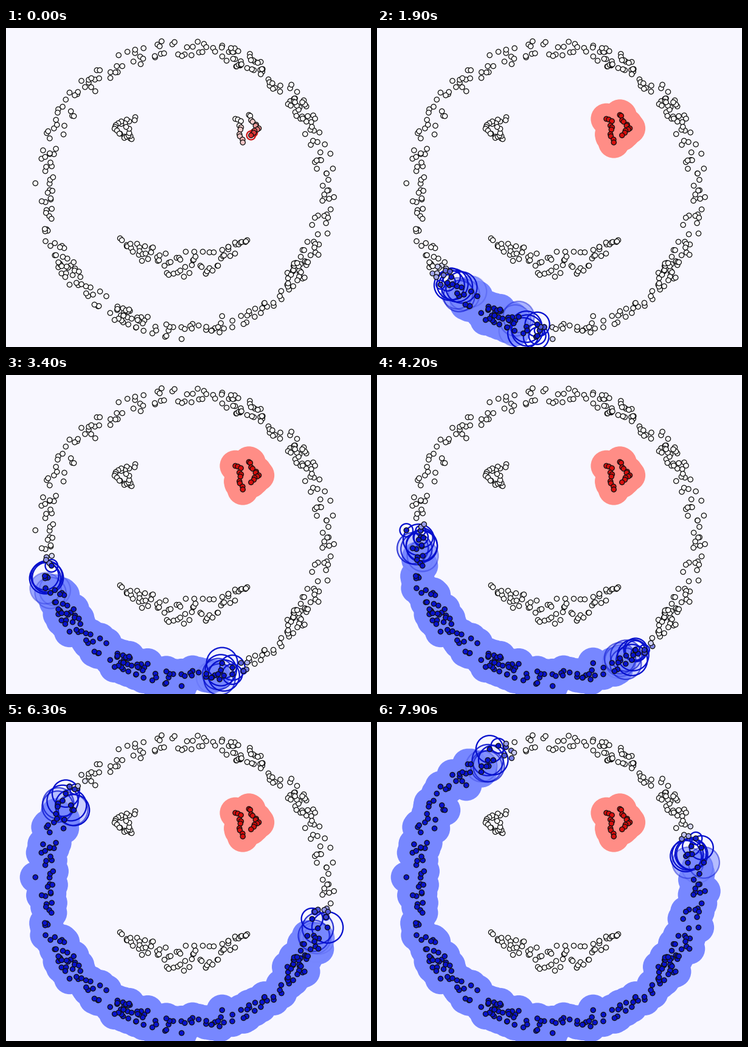
Recreate the animation shown at these times as a matplotlib script. Size 600 px wide and 524 px high, loop 8000 ms.

```python
import numpy as np
import matplotlib.pyplot as plt
from matplotlib.animation import FuncAnimation

W, H, DPI = 600, 524, 100
FRAMES, STEP = 80, 100
EPS = 25.6
GROW, HOLD, FADE = 300, 100, 300
PX = 72 / DPI

rng = np.random.default_rng(7)


def along(path, n, spread):
    """Scatter n points along a polyline."""
    path = np.array(path, float)
    s = np.r_[0, np.cumsum(np.hypot(*np.diff(path, axis=0).T))]
    u = np.linspace(0, s[-1], n)
    xy = np.c_[np.interp(u, s, path[:, 0]), np.interp(u, s, path[:, 1])]
    return xy + rng.uniform(-spread, spread, xy.shape)


def make_ring(n=290, clumped=80):
    """Loose ring with a few denser spots; returns positions and angles."""
    even = (np.arange(n) + rng.uniform(-2, 2, n)) * 360 / n
    dense = rng.choice([35, 115, 147, 295, 325], clumped) + rng.normal(0, 4, clumped)
    deg = np.r_[even, dense]
    rad = rng.uniform(217, 247, len(deg))
    a = np.radians(deg)
    return np.c_[294 + rad * np.cos(a), 264 + rad * np.sin(a)], deg


def make_mouth(n=74):
    u = np.linspace(-1, 1, n) + rng.uniform(-0.03, 0.03, n)
    bow = 1 - u ** 2
    return np.c_[293 + 103 * u, 346 + 18 * bow + (5 + 42 * bow) * rng.random(n)]


def ring_start(deg):
    """Time at which the front, spreading both ways from 119 degrees, arrives."""
    turn = (deg - 119 + 180) % 360 - 180
    return 600 + np.abs(turn) * np.where(turn > 0, 56, 53) + rng.uniform(-80, 80, len(deg))


ring, ring_deg = make_ring()
left_eye = along([(212, 148), (192, 155), (177, 158), (188, 174), (206, 183), (199, 163)], 24, 3)
right_eye = np.vstack([along([(378, 148), (386, 155), (384, 176), (391, 187)], 10, 2.5),
                       along([(401, 141), (405, 152), (416, 165), (404, 177)], 11, 2)])
plain = np.vstack([left_eye, make_mouth()])

eye_start = 14 * np.hypot(*(right_eye - (405, 175)).T) - 120
grown = np.vstack([right_eye, ring])
start = np.r_[eye_start, ring_start(ring_deg)]
is_red = (np.arange(len(grown)) < len(right_eye))[:, None]


def pick(r, b):
    return np.where(is_red, np.array(r) / 255, np.array(b) / 255)


AREA = pick((255, 141, 134), (119, 135, 255))
LINE = pick((205, 25, 25), (6, 16, 205))
DOT = pick((214, 14, 12), (8, 18, 205))

fig = plt.figure(figsize=(W / DPI, H / DPI), dpi=DPI, facecolor="#f8f7ff")
ax = fig.add_axes([0, 0, 1, 1])
ax.set(xlim=(0, W), ylim=(H, 0))
ax.axis("off")


def dots(xy, diameter, width, z, **kw):
    return ax.scatter(*xy.T, s=(diameter * PX) ** 2, linewidths=width * PX, zorder=z, **kw)


areas = dots(grown, 2 * EPS, 0, 1, c="white")
rings = dots(grown, 1, 2.3, 2, facecolors="none", edgecolors="black")
points = dots(grown, 8.2, 1.3, 3, facecolors="white", edgecolors="#111111")
dots(plain, 8.2, 1.3, 3, facecolors="white", edgecolors="#111111")


def draw(i):
    age = i * STEP - start
    fade = np.clip((age - GROW - HOLD) / FADE, 0, 1)
    size = 2 * EPS * np.clip(age / GROW, 0, 1)
    tint = np.clip((age + 260) / 400, 0, 1)[:, None]

    areas.set_facecolor(np.c_[AREA, fade])
    rings.set_sizes((size * PX) ** 2)
    rings.set_edgecolor(np.c_[LINE, np.where(age > 0, 1 - fade, 0)])
    points.set_facecolor(1 + (DOT - 1) * tint)
    return areas, rings, points


anim = FuncAnimation(fig, draw, frames=FRAMES, interval=STEP, repeat=True,
                     repeat_delay=0, blit=False)
plt.show()
```
